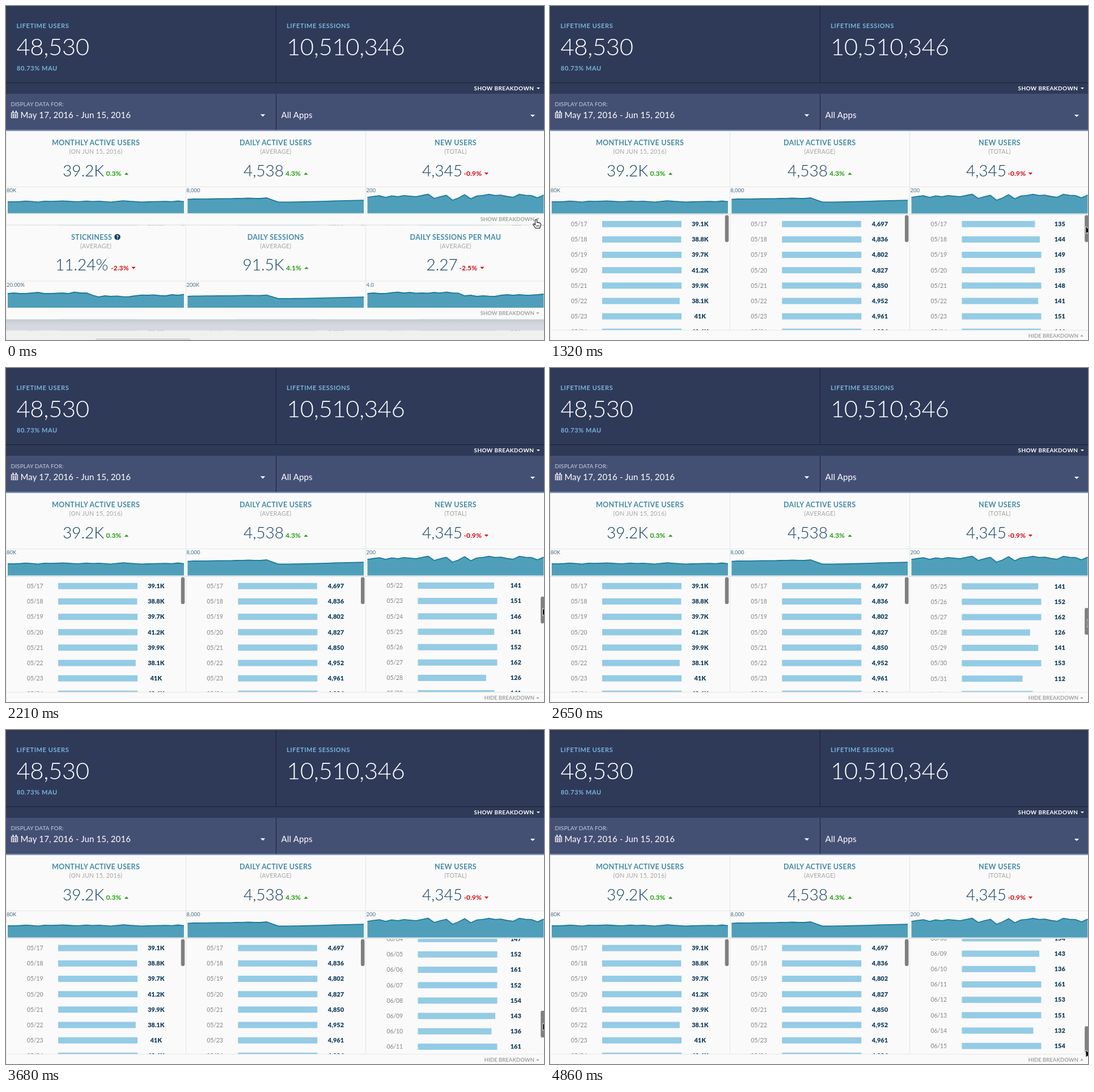
These frames come from a looping animation (949 by 590 pixels, 5010 ms). An HTML page:

```html
<!DOCTYPE html>
<html lang="en">
<head>
<meta charset="utf-8">
<title>Usage dashboard</title>
<style>
  html, body { margin: 0; width: 100%; height: 100%; overflow: hidden; background: #fafafa; }
  svg { display: block; width: 100%; height: 100%; }
  text { font-family: Lato, "Open Sans", sans-serif; white-space: pre; }
</style>
</head>
<body>
<svg id="stage" viewBox="0 0 949 590"></svg>
<script>
const LOOP = 5010, FIRST_STEP = 140, STEP = 147.5;
const COLUMN = 317.25, ROW_SHIFT = 166.5, PITCH = 27.17, LIST_HEIGHT = 206;
const INK = '#123f5c', GRAY = '#a3a3a3', GREEN = '#1f9d0c', RED = '#d9000d', SKY = '#79b4da';

// Drawing helpers
const text = (s, x, y, size, fill, { weight = 400, anchor = 'start', spacing = 0 } = {}) =>
  `<text x="${x}" y="${y}" font-size="${size}" fill="${fill}" font-weight="${weight}" text-anchor="${anchor}" letter-spacing="${spacing}">${s}</text>`;
const rect = (x, y, w, h, fill, extra = '') =>
  `<rect x="${x}" y="${y}" width="${w}" height="${h}" fill="${fill}" ${extra}/>`;
const path = (d, extra) => `<path d="${d}" ${extra}/>`;
const caret = (x, y, half, fill, up) => {
  const h = up ? -half : half;
  return path(`M${x - half} ${y - h / 2}h${half * 2}l${-half} ${h}z`, `fill="${fill}"`);
};
const group = (x, y, content, id = '') =>
  `<g id="${id}" transform="translate(${x} ${y})">${content}</g>`;

// Series are heights above the chart's base line
const newUsers = [135, 144, 149, 135, 148, 141, 151, 146, 141, 152, 162, 126, 141, 153, 112,
  131, 158, 124, 147, 152, 161, 152, 154, 143, 136, 161, 153, 151, 132, 154];
const monthly = [39.1, 38.8, 39.7, 41.2, 39.9, 38.1, 41, 40.4, 41, 41.7, 40.5, 39.5, 40, 41.2, 40,
  40.8, 39.2, 38.2, 40.2, 42.2, 40.6, 39.5, 38, 38.6, 39.5, 40, 40.4, 39.5, 41.5, 39.2];
const stickiness = [25, 26, 25, 25, 26, 27, 25, 25, 25.5, 26, 25, 27.5, 26, 26, 22,
  19, 21, 20, 20.7, 19.3, 19.5, 21, 22.3, 22, 22.6, 21.5, 21, 23, 22, 23.7];
const perUser = [25, 26, 25, 25, 26.5, 27.5, 26, 27, 25.5, 26, 25.5, 27, 26, 27.5, 26,
  25.7, 21, 22, 20, 21, 20.3, 20, 22, 23, 22, 23, 22, 22.3, 23, 24];
const dailyTrend = [[0, 24.8], [1, 25.5], [7, 26.2], [10, 27], [12, 26.5], [13, 27.5],
  [15, 20], [18, 20.3], [21, 21], [25, 22.3], [29, 23.4]];

const track = (keys, t) => {
  if (t <= keys[0][0]) return keys[0][1];
  for (let i = 1; i < keys.length; i++) {
    const [t0, v0] = keys[i - 1], [t1, v1] = keys[i];
    if (t <= t1) return v0 + (v1 - v0) * (t - t0) / (t1 - t0);
  }
  return keys[keys.length - 1][1];
};
const daily = Array.from({ length: 30 }, (_, i) => track(dailyTrend, i));

const cards = [
  { title: 'MONTHLY ACTIVE USERS', note: '(ON JUN 15, 2016)', value: '39.2K', x: 100,
    delta: '0.3%', dx: 176.5, cx: 212.5, axis: '80K', heights: monthly.map(v => v * .53) },
  { title: 'DAILY ACTIVE USERS', note: '(AVERAGE)', value: '4,538', x: 419,
    delta: '4.3%', dx: 493, cx: 529, axis: '8,000', heights: daily },
  { title: 'NEW USERS', note: '(TOTAL)', value: '4,345', x: 734,
    delta: '-0.9%', dx: 807.5, cx: 847.5, axis: '200', heights: newUsers.map(v => v * .21) },
  { title: 'STICKINESS', note: '(AVERAGE)', value: '11.24%', x: 87,
    delta: '-2.3%', dx: 185, cx: 225, axis: '20.00%', heights: stickiness },
  { title: 'DAILY SESSIONS', note: '(AVERAGE)', value: '91.5K', x: 417.5,
    delta: '4.1%', dx: 494, cx: 530, axis: '200K', heights: daily.map(h => h * .84 - .8) },
  { title: 'DAILY SESSIONS PER MAU', note: '(AVERAGE)', value: '2.27', x: 741.5,
    delta: '-2.5%', dx: 799.5, cx: 840, axis: '4.0', heights: perUser },
];

function chart(heights, left) {
  const line = heights.map((h, i) => `${(left + 3 + i * 10.72).toFixed(1)} ${(366.5 - h).toFixed(1)}`).join('L');
  return path(`M${line}V366.5H${left + 3}Z`, 'fill="#509fba"') +
    path(`M${line}`, 'fill="none" stroke="#1d7b9b" stroke-width="1.8"');
}

function card(c, i) {
  const left = (i % 3) * COLUMN, mid = left + 158.5, up = c.delta[0] !== '-';
  const tone = up ? GREEN : RED, help = c.title === 'STICKINESS';
  return text(c.title, help ? 151 : mid, 246, 12.5, '#458aa6', { weight: 700, anchor: 'middle', spacing: .3 }) +
    (help ? `<circle cx="196.5" cy="241.5" r="5.3" fill="${INK}"/>` +
      text('?', 196.5, 245, 9, '#fff', { weight: 900, anchor: 'middle' }) : '') +
    text(c.note, mid, 261, 10.5, GRAY, { anchor: 'middle', spacing: .3 }) +
    text(c.value, c.x, 300.5, 28, INK, { weight: 300 }) +
    text(c.delta, c.dx, 300, 12, tone, { weight: 700, spacing: .1 }) +
    caret(c.cx, 296.2, 3.7, tone, up) +
    text(c.axis, left + 1, 329.3, 9.5, '#4b6d83') +
    chart(c.heights, left);
}

const cardRow = list =>
  rect(0, 221, 949, 146, '#fafafa') +
  path('M0 319.5H949M317.5 221V367M634.5 221V367M.5 221V367', 'stroke="#e4e5e6"') +
  list.map(card).join('');

const footer = (label, y, up, id) =>
  `<g id="${id}">` + text(label, 932, y, 9.5, GRAY, { weight: 700, anchor: 'end' }) +
  caret(938, y - 3.5, 3, GRAY, up) + '</g>';

// Daily lists
const dateLabel = i => i < 15 ? `05/${17 + i}` : `06/${String(i - 14).padStart(2, '0')}`;
const row = (label, width, i) => {
  const y = 385 + i * PITCH;
  return text(dateLabel(i), 37, y + 4, 10.5, '#858585', { spacing: -.15 }) +
    rect(92, y - 5.3, Math.min(140, width), 11, '#94cbe5') +
    text(label, 264.7, y + 4, 11, INK, { weight: 900, anchor: 'middle' });
};
const thumb = id => rect(308.7, 369.5, 6.5, 47.5, '#7f7f7f', `rx="3" id="${id}"`);
const dailyUsers = [4697, 4836, 4802, 4827, 4850, 4952, 4961, 4894];
const lists = [
  monthly.slice(0, 8).map((v, i) => row(v + 'K', v * 3.59, i)),
  dailyUsers.map((v, i) => row(v.toLocaleString('en-US'), v * .0297, i)),
  newUsers.map((v, i) => row(v, v * .955, i)),
];
const breakdown = rect(0, 367, 949, 223, '#fafafa') +
  path('M.5 367V590M317.5 367V573M634.5 367V573', 'stroke="#e4e5e6"') +
  lists.map((rows, i) => group(i * COLUMN, 0, group(0, 0, rows.join(''), 'rows' + i) + thumb('thumb' + i))).join('');

const calendar = path('M9.5 188.5h11v9h-11zM9.5 191h11M13.2 191v6.5M16.9 191v6.5M9.5 194.2h11', 'fill="none" stroke="#fff" stroke-width="1.1"') +
  path('M12.4 185v4M17.8 185v4', 'stroke="#fff" stroke-width="2"');
const caps = { weight: 700, spacing: .6 };
const header =
  rect(0, 0, 949, 155, '#2f3a59') + rect(0, 155, 949, 64, '#444f74') + rect(0, 218.7, 949, 2.3, '#7f98bb') +
  path('M0 135.5H949M476.5 0V135.5M476.5 155V219', 'stroke="#1c2233"') +
  text('LIFETIME USERS', 18.5, 38.5, 11, SKY, caps) +
  text('48,530', 18.5, 87, 42, '#fff', { weight: 300, spacing: -.5 }) +
  text('80.73% MAU', 19, 113.5, 11, SKY, caps) +
  text('LIFETIME SESSIONS', 495, 38.5, 11, SKY, caps) +
  text('10,510,346', 495, 87, 42, '#fff', { weight: 300, spacing: -.5 }) +
  text('SHOW BREAKDOWN', 825.5, 149, 10, '#fff', { weight: 700, spacing: .4 }) +
  caret(939, 145.5, 3, '#fff') +
  text('DISPLAY DATA FOR:', 8.5, 177.3, 10, '#c9cedb', { spacing: .1 }) + calendar +
  text('May 17, 2016 - Jun 15, 2016', 25.5, 197.5, 15, '#fff', { spacing: .15 }) +
  text('All Apps', 485.5, 197.5, 15, '#fff', { spacing: .15 }) +
  caret(453, 193.3, 4.2, '#fff') + caret(929, 194, 4.2, '#fff');

const lower =
  rect(0, 367, 949, 20, '#fafafa') +
  path('M0 366.7H949M0 386.5H949M.5 367V387', 'stroke="#e4e5e6"') +
  footer('SHOW BREAKDOWN', 379.8, false, 'show') + footer('HIDE BREAKDOWN', 379.8, true, 'hide') +
  group(0, ROW_SHIFT, cardRow(cards.slice(3)).replace(/#help/g, '')) +
  rect(0, 533.5, 949, 20, '#fafafa') + path('M0 387H949M.5 533V553', 'stroke="#e4e5e6"') +
  footer('SHOW BREAKDOWN', 546.3, false, 'more') +
  rect(0, 553.5, 949, 20, 'url(#shade)') + rect(0, 573.5, 949, 240, '#f0f0f0') +
  rect(158.5, 588.5, 167, 24, '#fff', 'stroke="#a9a9a9" rx="2"');

const hand = path('M-1.6 1.2Q0-1 1.6 1.2V5.5q1.6-1 2.5.4q1.5-.7 2.2.6q1.8-.3 1.8 1.2V11L6.5 15.5H-.8L-4.8 9.7q-1-2.2.9-2L-1.6 9.5Z',
    'fill="#fff" stroke="#111" stroke-width="1.1"') +
  path('M1 10v3M3 10v3M5 10v3', 'stroke="#111" stroke-width=".8"');
const arrow = path('M0 0V13.5L3 10.7 5 15.3 7.2 14.3 5.2 9.8H9.5Z', 'fill="#000" stroke="#fff" stroke-width=".9"');

const stage = document.getElementById('stage');
stage.innerHTML =
  '<linearGradient id="shade" x2="0" y2="1"><stop stop-color="#c5cad2"/><stop offset=".5" stop-color="#d5d9df"/><stop offset="1" stop-color="#d5d9df"/></linearGradient>' +
  breakdown + header + cardRow(cards.slice(0, 3)) + rect(0, 367, 949, 2, '#e3e5e6') +
  group(0, 0, lower, 'lower') + group(0, 0, hand, 'hand') + group(0, 0, arrow, 'arrow');

// Motion: [time, value]
const scrollKeys = [[1320, 0], [1760, 56], [2650, 217.3], [3240, 378], [3970, 588.7], [4270, 615], [4860, 615]];
const pointerX = [[590, 935], [1040, 945], [1760, 945], [2650, 948], [3240, 948], [3970, 946], [4860, 945]];
const pointerY = [[590, 377], [1040, 389], [1320, 389], [1760, 404], [2650, 444.5], [3240, 489.5], [3970, 536], [4860, 565]];

const byId = id => document.getElementById(id);
const move = (id, x, y) => byId(id).setAttribute('transform', `translate(${x} ${y})`);
const show = (id, on) => byId(id).setAttribute('visibility', on ? 'visible' : 'hidden');

function draw(now) {
  const clock = now % LOOP;
  const t = clock < FIRST_STEP ? 0 : FIRST_STEP + Math.floor((clock - FIRST_STEP + 5) / STEP) * STEP;
  const open = (1 - Math.cos(Math.PI * Math.min(1, t / 580))) / 2;
  const scroll = track(scrollKeys, t);
  const x = track(pointerX, t), y = track(pointerY, t);
  move('lower', 0, LIST_HEIGHT * open);
  move('rows2', 0, -scroll);
  move('thumb2', 0, scroll / 4);
  move('hand', x, y);
  move('arrow', x, y);
  show('show', open === 0);
  show('hide', open > 0);
  show('hand', t < 650);
  show('arrow', t >= 650);
  requestAnimationFrame(draw);
}
requestAnimationFrame(draw);
</script>
</body>
</html>
```
